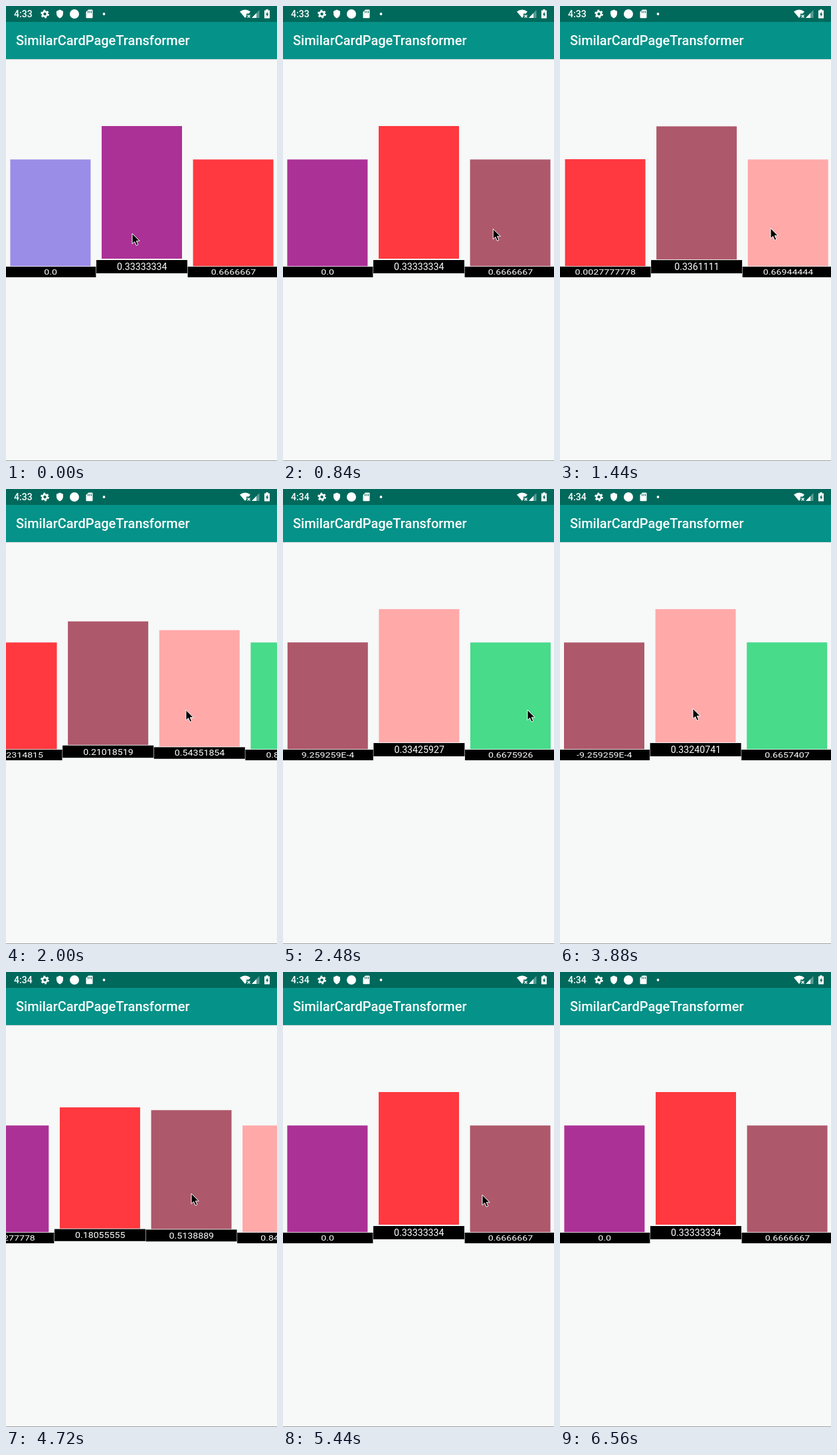
Recreate the animation shown at these times as an HTML page. Size 408 by 686 pixels, loop 6640 ms.

```html
<!DOCTYPE html>
<html lang="en">
<head>
<meta charset="utf-8">
<title>Card pager</title>
<style>
  html, body { margin: 0; width: 100%; height: 100%; overflow: hidden; background: #f7f8f8; }
  #stage { position: relative; width: 408px; height: 686px; overflow: hidden; background: #f7f8f8;
    font-family: Roboto, sans-serif; color: #fff; }
  #stage > * { position: absolute; }
  #status { left: 0; top: 0; width: 408px; height: 24px; background: #00695c; }
  #clock { left: 12px; top: 4px; font: 500 14px/17px Roboto, sans-serif; }
  #icons { left: 0; top: 0; }
  #toolbar { left: 0; top: 24px; width: 408px; height: 56px; background: #059288;
    box-shadow: 0 1px 1px rgba(0, 0, 0, .12); }
  #title { left: 15px; top: 40px; font: 500 20px/25px Roboto, sans-serif; white-space: nowrap; }
  #edge { left: 0; top: 685px; width: 408px; height: 1px; background: #a0a2a2; }
  .page { left: 0; top: 180.5px; width: 137.6px; height: 222px; transform-origin: 0 252px; }
  .card { position: absolute; left: 8.2px; top: 0; width: 121.2px; height: 200.5px; }
  .label { position: absolute; left: .3px; top: 202px; width: 137px; height: 20px; background: #000;
    font-size: 14.2px; line-height: 21px; text-align: center; white-space: nowrap; }
  #cursor { left: 0; top: 0; }
</style>
</head>
<body>
<div id="stage">
  <div id="status"></div>
  <div id="toolbar"></div>
  <div id="clock">4:33</div>
  <div id="title">SimilarCardPageTransformer</div>
  <svg id="icons" width="408" height="24" fill="#fff">
    <circle cx="58.5" cy="12" r="3.5" fill="none" stroke="#fff" stroke-width="2.6"/>
    <circle cx="58.5" cy="12" r="5.4" fill="none" stroke="#fff" stroke-width="2" stroke-dasharray="2.8 2.855"/>
    <path d="M81 5.5l5 2.2v3.5c0 3.3-2 6-5 7.3-3-1.3-5-4-5-7.3V7.700z"/>
    <circle cx="103" cy="12" r="7"/>
    <path d="M124 5.500h5.500q1 0 1 1v10.800q0 1-1 1h-8q-1 0-1-1V9z"/>
    <path d="M123.500 7.500v3M126 7.500v3M128.500 7.500v3" stroke="#00695c" stroke-width="1.100"/>
    <circle cx="147.500" cy="12" r="1.900"/>
    <path d="M352 8.500q8-6 16 0l-2.500 3h-3.500v4l-2 2.500z"/>
    <path d="M363.500 13.500l4 4m0-4l-4 4" stroke="#fff" stroke-width="1.300"/>
    <path d="M370 18L381.500 6v12z" opacity=".35"/>
    <path d="M370 18l7-7.300V18z"/>
    <path d="M391.500 5h3v1.500h2.500v12h-8v-12h2.500z"/>
    <path d="M393.800 8.500l-2.800 4.700h1.700v3.300l2.700-4.700h-1.600z" fill="#00695c"/>
  </svg>
  <div id="edge"></div>
  <svg id="cursor" width="16" height="22" viewBox="-1 -1 16 22">
    <path d="M0 0V15.500L3.600 12.200L6.200 18L8.800 16.900L6.300 11.200H11.200Z"
      fill="#000" stroke="#fff" stroke-width="1"/>
  </svg>
</div>
<script>
const LOOP = 6640, STEP = 40;
const VIEW = 1080, PAGE = VIEW / 3;        // device pixels
const WIDTH = 412.8, LEFT = -1.6;          // the pager on stage
const COLORS = ['#998de8', '#ab3196', '#ff393f', '#ae586b', '#ffa9a9', '#47db8a', '#00fbc8'];

// press, release, settled, from page, to page, share covered by the drag
const SWIPES = [
  [160, 380, 840, 0, 1, .5],
  [880, 1090, 1710, 1, 2, .47],
  [1860, 2070, 2710, 2, 3, .5],
  [2720, 2900, 3340, 3, 4, .5],
  [3420, 3610, 4030, 4, 3, .5],
  [4040, 4200, 4540, 3, 2, .5],
  [4560, 4720, 5440, 2, 1, 195 / 360]
];

// time, x, y of the pointer tip
const POINTER = [
  [0, 190, 343], [160, 310, 340], [380, 215, 338], [600, 215, 338], [860, 318, 336],
  [1090, 220, 336], [1200, 220, 336], [1440, 317, 335], [1860, 345, 334], [2070, 245, 333],
  [2200, 245, 333], [2480, 368, 333], [2720, 350, 331], [2900, 230, 328], [3120, 194, 327],
  [3420, 194, 327], [3610, 295, 330], [3660, 295, 330], [3880, 200, 331], [4040, 200, 331],
  [4200, 290, 333], [4280, 290, 333], [4520, 203, 333], [4560, 203, 333], [4720, 279, 334],
  [4880, 300, 336], [5560, 300, 336], [5720, 358, 470], [5840, 358, 470], [6080, 410, 600]
];

const $ = id => document.getElementById(id);
const smooth = u => u * u * (3 - 2 * u);

const pages = COLORS.map(color => {
  const page = document.createElement('div');
  page.className = 'page';
  page.innerHTML = '<div class="card"></div><div class="label"></div>';
  page.firstChild.style.background = color;
  $('stage').insertBefore(page, $('edge'));
  return page;
});

function scrollAt(t) {
  let scroll = 0;
  for (const [press, release, settled, from, to, share] of SWIPES) {
    if (t < press) break;
    const done = t < release
      ? share * smooth((t - press) / (release - press))
      : 1 - (1 - share) * (1 - Math.min(1, (t - release) / (settled - release))) ** 5;
    scroll = from + (to - from) * done;
  }
  return Math.round(scroll * PAGE);
}

function pointerAt(t) {
  const next = POINTER.findIndex(point => point[0] > t);
  if (next < 0) return [420, 620];
  const [t0, x0, y0] = POINTER[next - 1], [t1, x1, y1] = POINTER[next];
  const u = smooth((t - t0) / (t1 - t0));
  return [x0 + (x1 - x0) * u, y0 + (y1 - y0) * u];
}

// Shortest single-precision decimal, written the way Java does
function floatText(value) {
  const f = Math.fround(value);
  if (f === 0) return '0.0';
  let digits = 1;
  while (digits < 9 && Math.fround(+f.toPrecision(digits)) !== f) digits++;
  const short = +f.toPrecision(digits);
  const dotted = s => s.includes('.') ? s : s + '.0';
  if (Math.abs(f) >= 1e-3) return dotted(String(short));
  const [mantissa, exponent] = short.toExponential().split('e');
  return dotted(mantissa) + 'E' + exponent;
}

function render(t) {
  const scroll = scrollAt(t);
  pages.forEach((page, i) => {
    const position = (i * PAGE - scroll) / VIEW;
    const scale = 1 - .2 * Math.min(1, Math.abs(position - 1 / 3) * 3);
    page.style.display = Math.abs(position) < 1.1 ? '' : 'none';
    page.style.transform = `translateX(${LEFT + position * WIDTH}px) scaleY(${scale})`;
    page.lastChild.textContent = floatText(position);
  });
  const [x, y] = pointerAt(t);
  $('cursor').style.transform = `translate(${x - 1}px, ${y - 1}px)`;
  $('clock').textContent = t < 2280 ? '4:33' : '4:34';
}

const start = performance.now();
function tick(now) {
  const t = Math.max(0, now - start) % LOOP;
  render(Math.floor(t / STEP) * STEP);
  requestAnimationFrame(tick);
}
render(0);
requestAnimationFrame(tick);
</script>
</body>
</html>
```
